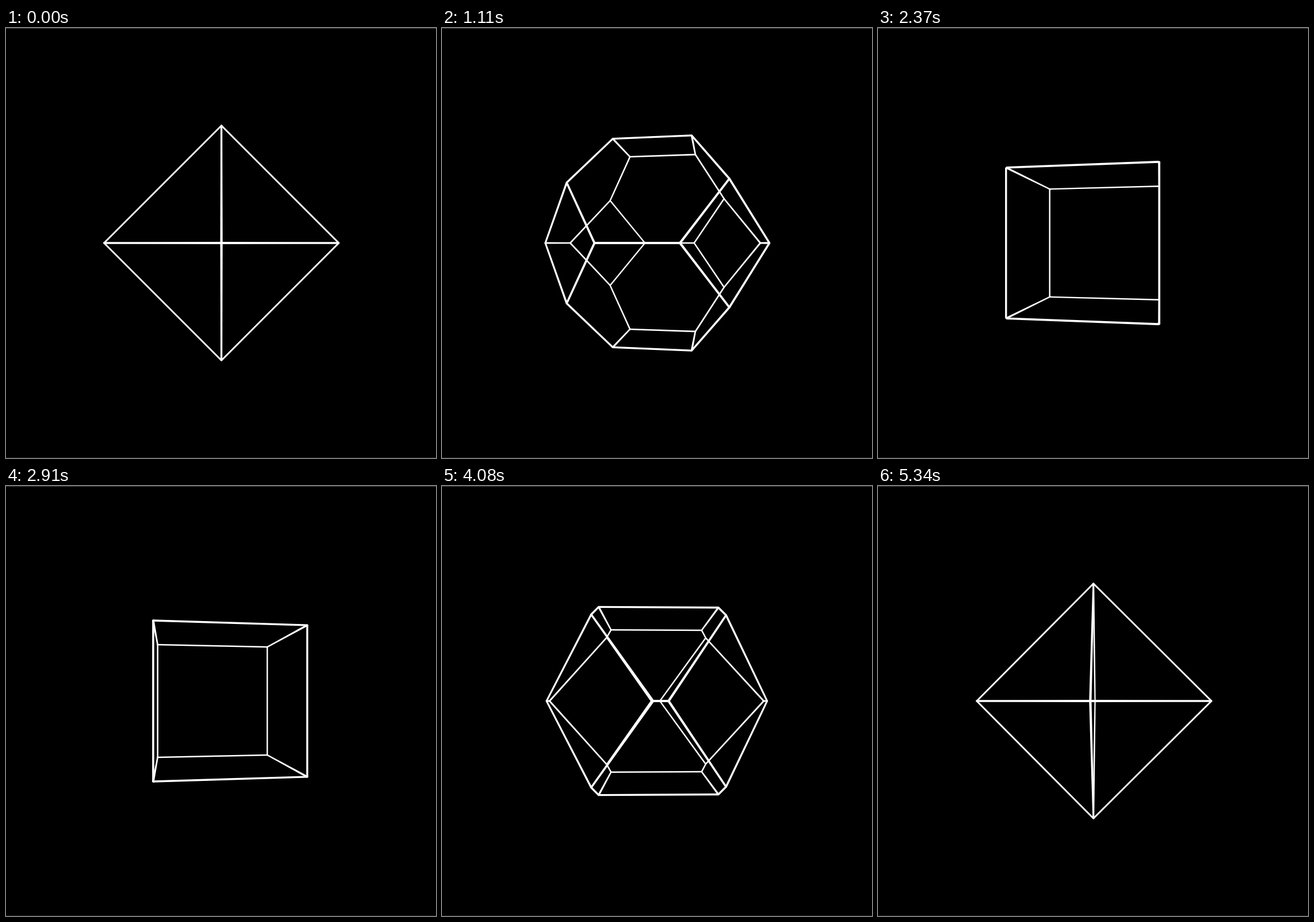
These frames come from a looping animation (748 px wide and 748 px high, 5370 ms). An HTML page with a canvas:

```html
<!DOCTYPE html>
<html>
<head>
<meta charset="utf-8">
<style>
  html, body { margin: 0; width: 100%; height: 100%; overflow: hidden; background: #000; }
  canvas { display: block; }
</style>
</head>
<body>
<canvas id="stage" width="748" height="748"></canvas>
<script>
const ctx = document.getElementById('stage').getContext('2d');
const SIZE = 748, CX = 374.75, CY = 374, STEPS = 179, STEP_MS = 30;
const DEPTH = SIZE / 2 / Math.tan(Math.PI / 6);
const LINE = 2.9;

const mix = (a, b, k) => a + (b - a) * k;
const triples = v => v.flatMap(x => v.flatMap(y => v.map(z => [x, y, z])));
const near = (a, b) => Math.abs(a - b) < 1e-6;

// Outward directions of the 6 cube faces and the 8 octahedron faces
const normals = triples([-1, 0, 1]).filter(n => n.filter(c => c).length % 2);

// Intersection of a cube and an octahedron: form 1 is the octahedron, 2 the cuboctahedron, 3 the cube
function solid(form) {
  const upper = form > 2;
  const k = Math.min(0.999, Math.max(0.001, form - (upper ? 2 : 1)));
  const q = upper ? mix(133.7, 112.4, k) : mix(204, 133.7, k);
  const p = k * q;
  const reach = p + (upper ? 2 * q : q);
  const inner = upper ? [p, q, q] : [0, p, q];
  const points = triples([-q, -p, 0, p, q]).filter(v => {
    const sorted = v.map(Math.abs).sort((a, b) => a - b);
    return sorted.every((c, i) => c === inner[i]);
  });
  const faces = points.map(v => normals.map(n => {
    const dist = n[0] * v[0] + n[1] * v[1] + n[2] * v[2];
    return near(dist, n.every(c => c) ? reach : q);
  }));
  const edges = [];
  for (let i = 0; i < points.length; i++)
    for (let j = 0; j < i; j++)
      if (normals.filter((_, f) => faces[i][f] && faces[j][f]).length > 1) edges.push([i, j]);
  return { points, edges };
}

function project([x, y, z], angle) {
  const c = Math.cos(angle), s = Math.sin(angle);
  const scale = DEPTH / (DEPTH - (z * c - x * s));
  return { x: CX + (x * c + z * s) * scale, y: CY + y * scale, r: LINE * scale / 2 };
}

// Line whose thickness follows the perspective
function bar(a, b) {
  const len = Math.hypot(b.x - a.x, b.y - a.y);
  if (len < 0.01) return;
  const nx = (a.y - b.y) / len, ny = (b.x - a.x) / len;
  ctx.beginPath();
  ctx.moveTo(a.x + nx * a.r, a.y + ny * a.r);
  ctx.lineTo(b.x + nx * b.r, b.y + ny * b.r);
  ctx.lineTo(b.x - nx * b.r, b.y - ny * b.r);
  ctx.lineTo(a.x - nx * a.r, a.y - ny * a.r);
  ctx.fill();
}

function dot(p) {
  ctx.beginPath();
  ctx.arc(p.x, p.y, p.r, 0, 7);
  ctx.fill();
}

function draw(step) {
  // Cubic ease away from the octahedron at the ends and the cube in the middle
  const away = Math.abs(step - 90);
  const form = away > 44.75
    ? 1 + (Math.max(0, 89.5 - away) / 45) ** 3
    : 3 - (away / 45) ** 3;
  // Half a turn per loop with a slight sway
  const turn = Math.PI * step / STEPS;
  const angle = turn - 0.0115 * Math.sin(3 * turn);

  ctx.fillStyle = '#000';
  ctx.fillRect(0, 0, SIZE, SIZE);
  ctx.fillStyle = '#444';
  ctx.fillRect(0, 0, SIZE, 1);
  ctx.fillStyle = '#222';
  ctx.fillRect(0, SIZE - 1, SIZE, 1);

  ctx.fillStyle = '#fff';
  const { points, edges } = solid(form);
  const flat = points.map(v => project(v, angle));
  edges.forEach(([i, j]) => bar(flat[i], flat[j]));
  flat.forEach(dot);
}

function tick() {
  draw(Math.floor(performance.now() / STEP_MS) % STEPS);
  requestAnimationFrame(tick);
}
tick();
</script>
</body>
</html>
```
